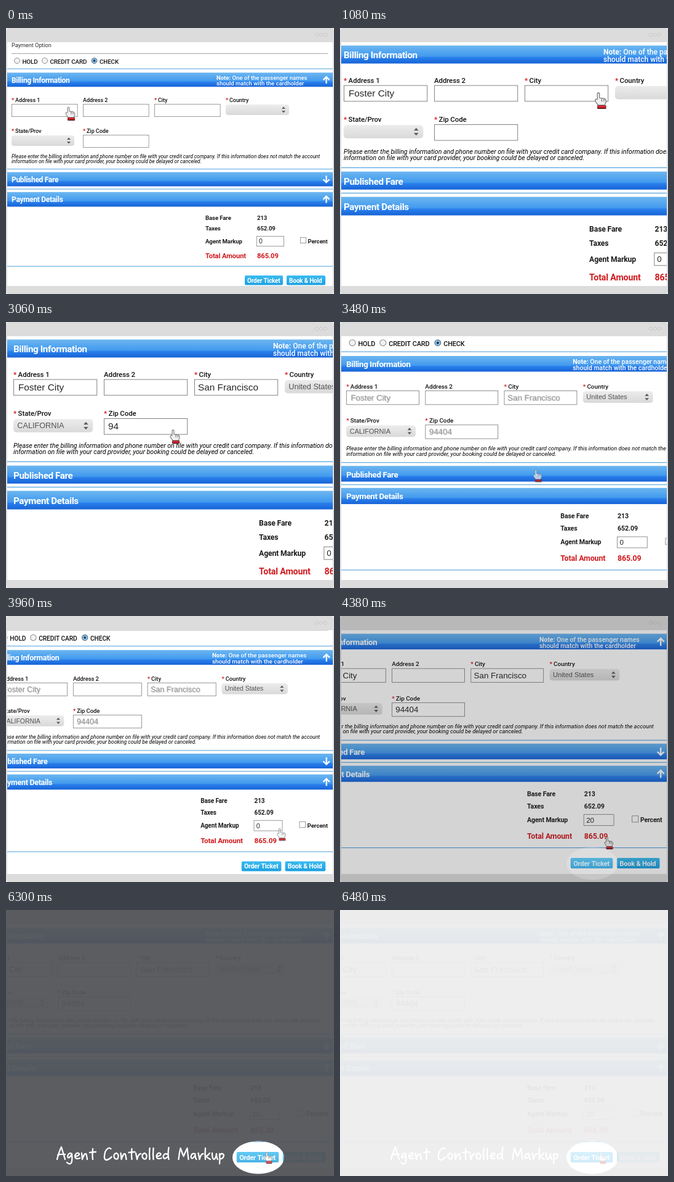
Animation of 533 by 431 pixels, one loop 6540 ms. Source, as an HTML page with a canvas:

```html
<!DOCTYPE html>
<html lang="en">
<head>
<meta charset="utf-8">
<title>Booking form</title>
<style>
html, body { margin: 0; width: 100%; height: 100%; overflow: hidden; background: #fff; }
canvas { display: block; width: 533px; height: 431px; }
</style>
</head>
<body>
<canvas id="stage" width="533" height="431" role="img" aria-label="Agent Controlled Markup"></canvas>
<script>
const W = 533, H = 431, LOOP = 6540, STEP = 60;
const g = document.getElementById('stage').getContext('2d');
const SANS = 'Roboto, sans-serif', ARIAL = '"Liberation Sans", Arial, sans-serif';

// Rows of [time, ...values], eased between rows.
const CAMERA = [
  [60, 1, 0, 0], [540, 1.267, -5.4, -63.2],
  [1380, 1.267, -5.4, -63.2], [1800, 1.267, -104, -63.2],
  [2040, 1.267, -104, -63.2], [2640, 1.267, 0.6, -63.2],
  [3240, 1.267, 0.6, -63.2], [3660, 1, 0, 0],
  [3720, 1, 0, 0], [4280, 1.105, -54, -51.2]
];
const HAND = [
  [840, 105, 139, 1], [1080, 339, 143, 0.94],
  [2460, 339, 143, 0.94], [2820, 216.6, 196.7, 0.8],
  [3300, 216.6, 196.7, 0.8], [3780, 450.6, 359.5, 0.88],
  [4200, 450.6, 359.5, 0.88], [4620, 435, 410, 0.75]
];

const clamp = v => Math.max(0, Math.min(1, v));
const mix = (a, b, k) => a + (b - a) * k;
const span = (t, a, b) => clamp((t - a) / (b - a));

function track(rows, t) {
  let i = 0;
  while (i < rows.length - 2 && t >= rows[i + 1][0]) i++;
  const a = rows[i], b = rows[i + 1];
  const u = span(t, a[0], b[0]), k = u * u * (3 - 2 * u);
  return a.slice(1).map((v, n) => mix(v, b[n + 1], k));
}

const typed = (s, start, t) => s.slice(0, Math.max(0, Math.floor((t - start) / STEP) + 1));

function text(s, x, y, font, color, gap = '0px') {
  g.font = font;
  g.letterSpacing = gap;
  g.fillStyle = color;
  g.fillText(s, x, y);
}

function rect(x, y, w, h, color) {
  g.fillStyle = color;
  g.fillRect(x, y, w, h);
}

function rounded(x, y, w, h, r, fill) {
  g.beginPath();
  g.roundRect(x, y, w, h, r);
  g.fillStyle = fill;
  g.fill();
}

function vertical(y, h, ...stops) {
  const grad = g.createLinearGradient(0, y, 0, y + h);
  stops.forEach(([p, c]) => grad.addColorStop(p, c));
  return grad;
}

function bar(title, y, h, dir) {
  rect(-200, y, 1000, h, vertical(y, h,
    [0, '#6cb6f0'], [0.6, '#429aee'], [0.66, '#2a80ec'], [1, '#1763d6']));
  text(title, 9, y + 16.6, '700 12px ' + SANS, '#fff', '-0.3px');
  g.save();
  g.translate(520.5, y + 11.8);
  g.scale(1, dir);
  g.strokeStyle = '#fff';
  g.lineWidth = 2.2;
  g.stroke(new Path2D('M0 6V-5M-5 0L0 -5L5 0'));
  g.restore();
}

function label(s, x, y, required) {
  if (required) text('*', x, y, '700 9px ' + SANS, '#d8141c');
  text(s, x + (required ? 6 : 0), y, '500 9px ' + SANS, '#111', '-0.05px');
}

function field(x, y, w, h) {
  rect(x, y, w, h, '#fff');
  g.lineWidth = 0.8;
  g.strokeStyle = '#858585';
  g.strokeRect(x + 0.4, y + 0.4, w - 0.8, h - 0.8);
}

function entry(s, x, y, moving) {
  const font = '12.1px ' + ARIAL;
  if (!moving) return text(s, x, y, font, '#262626');
  text(s, x + 0.9, y + 0.5, font, 'rgba(90,90,90,.4)');
  text(s, x, y, font, 'rgba(90,90,90,.5)');
}

function select(x, y, w, value) {
  rounded(x, y, w, 17, 4, vertical(y, 17, [0, '#ececec'], [1, '#d9d9d9']));
  text(value, x + 5, y + 12, '10px ' + ARIAL, '#525252');
  g.save();
  g.translate(x + w - 9, y + 8.5);
  g.fillStyle = '#5c5c5c';
  g.fill(new Path2D('M-3 -1.5L0 -5L3 -1.5ZM-3 1.5L0 5L3 1.5Z'));
  g.restore();
}

function disc(x, y, r, fill, stroke) {
  g.beginPath();
  g.arc(x, y, r, 0, 7);
  g.fillStyle = fill;
  g.fill();
  if (!stroke) return;
  g.strokeStyle = stroke;
  g.lineWidth = 1;
  g.stroke();
}

function radio(x, s, on) {
  disc(x, 53, 4.5, '#f2f2f2', '#8c8c8c');
  if (on) {
    disc(x, 53, 4, '#a9d2f2', '#4279a8');
    disc(x, 53, 2, '#173c5c');
  }
  text(s, x + 8.5, 57.5, '500 9.8px ' + SANS, '#111', '-0.1px');
}

function button(s, x, w) {
  rounded(x, 401, w, 15.5, 2, vertical(401, 15.5, [0, '#3bbcf0'], [1, '#1c9fe0']));
  text(s, x + 4, 412.6, '700 10px ' + SANS, '#fff', '-0.2px');
}

function hand(x, y, size, moving) {
  g.save();
  g.translate(x, y);
  g.scale(size, size);
  if (moving) g.globalAlpha *= 0.7;
  g.lineWidth = 1;
  g.lineJoin = 'round';
  g.fillStyle = '#f0f0f0';
  g.strokeStyle = '#6e6e6e';
  const palm = new Path2D('M-4 6L-8 0Q-8 -3 -5 -2V-9Q-5 -11 -3.5 -11Q-2 -11 -2 -9V-4L5 -3Q7 -2 7 1L5 6Z');
  g.fill(palm);
  g.stroke(palm);
  g.stroke(new Path2D('M1 -3V1M4 -2.5V1'));
  rounded(-5, 6, 12, 5, 1, '#4c1013');
  rect(-4.5, 6.5, 11, 3, '#dc2a30');
  g.restore();
}

function page(t) {
  const [s, x, y] = track(CAMERA, t);
  const before = track(CAMERA, t - STEP);
  const moving = Math.abs(x - before[1]) + Math.abs(y - before[2]) > 3;
  g.save();
  g.transform(s, 0, 0, s, x, y);

  text('Payment Option', 9, 31, '9.1px ' + SANS, '#2a2a2a');
  rect(9, 41, 514, 0.8, '#8f8f8f');
  radio(18, 'HOLD');
  radio(63, 'CREDIT CARD');
  radio(143.5, 'CHECK', true);
  for (const ly of [65.6, 228, 260.5, 385.6]) rect(-200, ly, 1000, 1.1, '#62abe2');

  bar('Billing Information', 72.3, 23, 1);
  bar('Published Fare', 233.5, 23, -1);
  bar('Payment Details', 265.8, 23.7, 1);
  text('Note:', 342, 84, '700 9.5px ' + SANS, '#fff');
  const indent = g.measureText('Note: ').width;
  text('One of the passenger names', 342 + indent, 84, '500 9.5px ' + SANS, '#fff');
  text('should match with the cardholder', 342, 93.2, '500 9.5px ' + SANS, '#fff');

  label('Address 1', 9, 120, true);
  label('Address 2', 125, 120);
  label('City', 241, 120, true);
  label('Country', 357, 120, true);
  label('State/Prov', 9, 170, true);
  label('Zip Code', 125, 170, true);
  for (const fx of [9, 125, 241]) field(fx, 123, 107.5, 21);
  field(125, 173, 107.5, 21);
  select(357, 124, 103, t >= 1860 ? 'United States' : '');
  select(9, 174, 102, t >= 1980 ? 'CALIFORNIA' : '');
  entry(typed('Foster City', 240, t), 15.3, 137.7, moving);
  entry(typed('San Francisco', 1140, t), 245.8, 137.7, moving);
  entry(typed('94404', 3000, t), 130.5, 187.5, moving);

  const small = 'italic 8.37px ' + SANS;
  text('Please enter the billing information and phone number on file with your credit card company. If this information does not match the account', 9, 210.7, small, '#000');
  text('information on file with your card provider, your booking could be delayed or canceled.', 9, 218.5, small, '#000');

  const bold = '700 9.6px ' + SANS, big = '700 11.2px ' + SANS;
  [['Base Fare', '213', 310.5], ['Taxes', '652.09', 328.3], ['Agent Markup', '', 348.7]].forEach(([a, b, ry]) => {
    text(a, 324, ry, bold, '#1c1c1c', '-0.1px');
    text(b, 408, ry, bold, '#1c1c1c', '-0.1px');
  });
  text('Total Amount', 324, 373, big, '#cf1a1e', '-0.1px');
  text('865.09', 408, 373, big, '#cf1a1e', '-0.1px');
  field(407, 337, 45, 17);
  text(t < 4020 ? '0' : typed('20', 4020, t), 411, 349.3, '10.5px ' + ARIAL, '#262626');
  field(478, 339, 10, 10);
  text('Percent', 490.5, 349, '700 9.4px ' + SANS, '#1c1c1c', '-0.1px');
  button('Order Ticket', 388, 62);
  button('Book & Hold', 456, 63);

  hand(...track(HAND, t), moving);
  g.restore();
}

function frame() {
  rounded(0, 0, W, H, 4, '#dcdcdc');
  rect(2, 23, 529, 395, '#fff');
  for (const x of [505, 512, 519]) disc(x, 11, 2.3, '#e6e6e6', '#c2c2c2');
}

// Pen strokes per letter: advance width and path, baseline at 0.
const PEN = {
  A: [17, 'M1 0Q4 -12 8 -20Q11 -10 14 0M2 -7Q8 -9 14 -8'],
  g: [12, 'M8 -9Q3 -12 1 -5Q2 1 8 -8Q9 2 7 6Q4 9 0 5'],
  e: [11, 'M1 -5Q8 -5 8 -9Q4 -13 1 -6Q1 1 9 -2'],
  n: [13, 'M1 -10L2 0Q5 -10 8 -9Q9 -7 10 0'],
  t: [11.5, 'M6 -17Q5 -6 6 0M1 -11Q6 -12 11 -12'],
  C: [16, 'M12 -17Q8 -21 3 -13Q-1 1 5 1Q10 0 13 -4'],
  o: [11, 'M5 -10Q0 -9 1 -4Q3 1 7 -1Q10 -8 5 -10'],
  r: [10.5, 'M1 -10L3 0Q5 -9 9 -9'],
  l: [6, 'M2 -18Q1 -8 2 0'],
  d: [13, 'M8 -8Q3 -11 1 -5Q2 2 8 -4M10 -19Q8 -8 10 0'],
  M: [20, 'M1 0Q2 -10 4 -18Q7 -10 9 -5Q12 -12 15 -18Q16 -8 17 0'],
  a: [12, 'M8 -9Q2 -11 1 -4Q3 2 8 -7Q8 -2 10 0'],
  k: [12, 'M2 -18Q1 -8 2 0M9 -10Q6 -6 3 -5Q6 -2 10 0'],
  u: [12, 'M1 -10Q1 0 4 0Q7 -1 8 -9Q8 -3 10 0'],
  p: [10, 'M1 -9Q2 0 1 7M1 -6Q5 -12 8 -7Q7 0 2 -1'],
  ' ': [12, '']
};

function write(s, x, y, shown) {
  g.save();
  g.beginPath();
  g.rect(x - 2, y - 30, 282 * shown, 50);
  g.clip();
  g.translate(x, y);
  g.strokeStyle = '#fff';
  g.lineWidth = 2.3;
  g.lineCap = g.lineJoin = 'round';
  for (const ch of s) {
    const [w, d] = PEN[ch];
    g.stroke(new Path2D(d));
    g.translate(w, 0);
  }
  g.restore();
}

function overlay(t) {
  const dark = span(t, 4320, 4620), light = span(t, 6240, 6480);
  if (!dark) return;
  const [r, gr, b] = [32, 35, 40].map(v => Math.round(mix(v, 238, light)));
  rect(0, 0, W, H, `rgba(${r},${gr},${b},${0.955 * dark})`);

  g.save();
  g.globalAlpha = dark;
  g.beginPath();
  g.ellipse(410, 401, 42, 26.5, 0, 0, 7);
  g.clip();
  rect(0, 0, W, H, '#fff');
  page(t);
  rect(0, 0, W, H, `rgba(255,255,255,${0.8 * light})`);
  g.restore();

  const u = span(t, 4500, 5520);
  if (u) write('Agent Controlled Markup', 82, 404, 1 - Math.pow(1 - u, 1.57));
}

function draw(now) {
  const t = Math.floor((now % LOOP) / STEP) * STEP;
  g.clearRect(0, 0, W, H);
  frame();
  g.save();
  g.beginPath();
  g.rect(2, 23, 529, 395);
  g.clip();
  page(t);
  g.restore();
  overlay(t);
}

let start;
function tick(now) {
  if (start === undefined) start = now;
  draw(now - start);
  requestAnimationFrame(tick);
}
draw(0);
requestAnimationFrame(tick);
</script>
</body>
</html>
```
